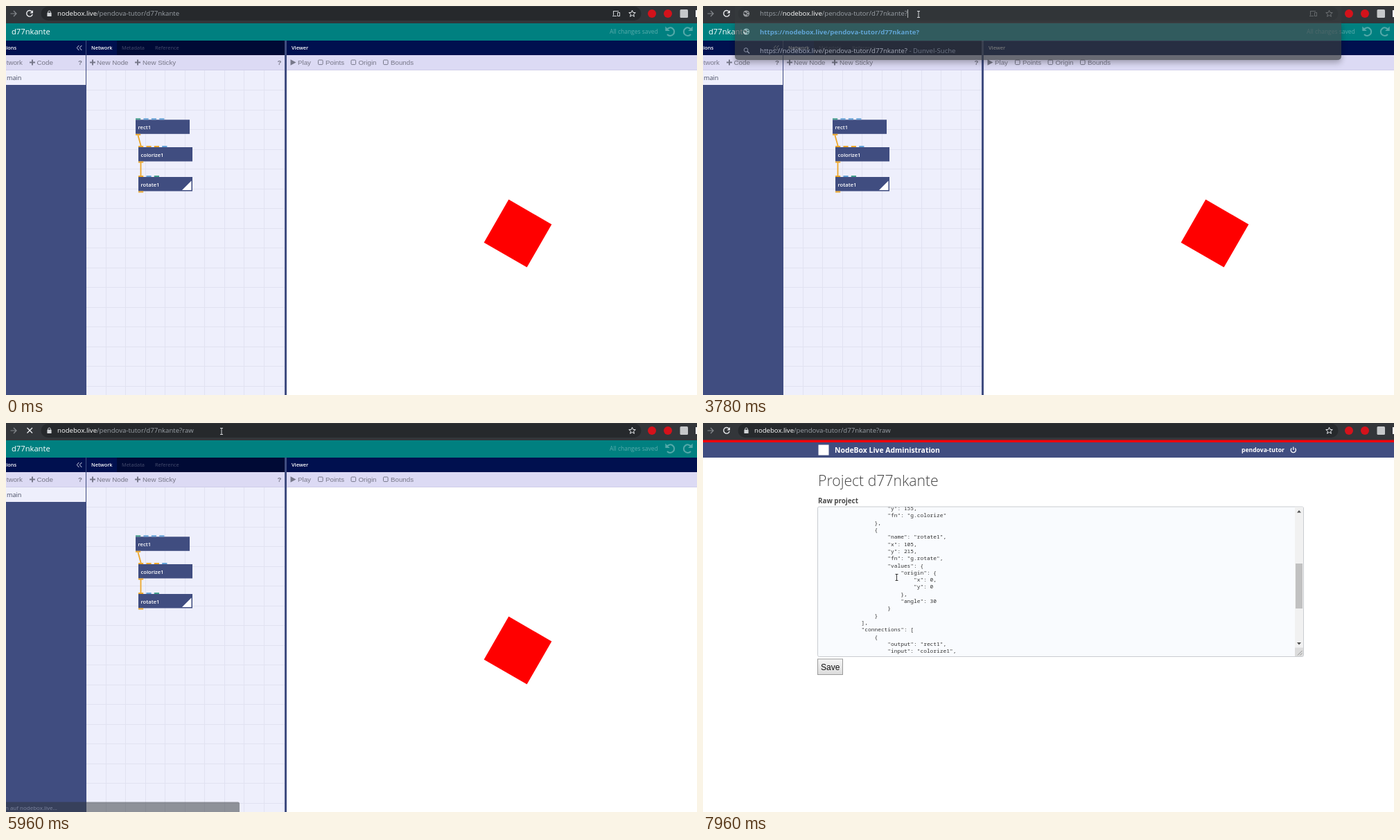
These frames come from a looping animation (997 px wide and 562 px high, 8 s). An HTML page:

```html
<!DOCTYPE html>
<html lang="de">
<head>
<meta charset="utf-8">
<title>Node editor</title>
<style>
html, body { margin: 0; width: 100%; height: 100%; overflow: hidden; background: #fff; }
svg { display: block; width: 997px; height: 562px; font-family: "Open Sans", "Noto Sans", sans-serif; }
text { white-space: pre; }
.ui { font-family: "Liberation Sans", Arial, sans-serif; font-size: 9.75px; fill: #777788; }
.code { font-family: "Noto Sans Mono", "DejaVu Sans Mono", monospace; font-size: 7.87px; fill: #333; }
</style>
</head>
<body>
<svg id="stage" viewBox="0 0 997 562">
  <defs>
    <clipPath id="area"><rect x="166" y="121.5" width="688" height="215.5"/></clipPath>
    <clipPath id="net"><rect x="116" y="93" width="286" height="469"/></clipPath>
    <linearGradient id="btn" x2="0" y2="1"><stop stop-color="#f6f6f6"/><stop offset="1" stop-color="#dcdcdc"/></linearGradient>
    <filter id="shadow" x="-5%" y="-30%" width="110%" height="180%">
      <feDropShadow dx="0" dy="4" stdDeviation="4" flood-opacity=".4"/>
    </filter>
  </defs>
</svg>
<script>
const LOOP = 8000;
const USER = 'pendova-tutor', PROJECT = 'd77nkante', HOST = 'nodebox.live';
const PATH = `/${USER}/${PROJECT}`;
const NAVY = '#00104f', INDIGO = '#404d80', ORANGE = '#eda82c', BLUE = '#64a3d8', GREEN = '#45a08c';
const WHITE = '#fff', GREY = '#9aa0a6', LIGHT = '#e8eaed';

const svg = document.getElementById('stage');

function el(parent, tag, attrs = {}) {
  const e = document.createElementNS('http://www.w3.org/2000/svg', tag);
  for (const k in attrs) e.setAttribute(k, attrs[k]);
  return parent.appendChild(e);
}
const group = (p, attrs) => el(p, 'g', attrs);
const rect = (p, x, y, width, height, fill, more) => el(p, 'rect', { x, y, width, height, fill, ...more });
const shape = (p, d, fill, more) => el(p, 'path', { d, fill, ...more });
const line = (p, d, stroke, w = 1.2) => shape(p, d, 'none', { stroke, 'stroke-width': w });
const disc = (p, cx, cy, r, fill, more) => el(p, 'circle', { cx, cy, r, fill, ...more });
function text(p, x, y, str, size, fill, more) {
  const e = el(p, 'text', { x, y, 'font-size': size, fill, ...more });
  e.textContent = str;
  return e;
}
function label(p, x, y, str, more) {
  el(p, 'text', { x, y, class: 'ui', ...more }).textContent = str;
}
const show = (e, on) => e.setAttribute('visibility', on ? 'visible' : 'hidden');

// Value of the last [time, value] step reached
const at = (t, steps) => steps.reduce((v, s) => (t >= s[0] ? s[1] : v), steps[0][1]);
const within = (t, ...spans) => spans.some(([a, b]) => t >= a && t < b);

// ---------- Editor page ----------
const editor = group(svg);
rect(editor, 0, 0, 997, 562, WHITE);
rect(editor, 0, 25, 997, 25, '#008080');
text(editor, 8, 40.5, PROJECT, 11.2, WHITE);
text(editor, 871, 39.5, 'All changes saved', 8.5, '#5aacac');
for (const flip of ['', 'translate(1942 0) scale(-1 1)']) {
  const g = group(editor, { transform: flip });
  line(g, 'M953.5 34A5.8 5.8 0 1 1 954 41', '#55a9a9', 2);
  shape(g, 'M951.3 29.5v6.5h6.5z', '#55a9a9');
}

rect(editor, 0, 50, 997, 21, NAVY);
rect(editor, 160, 50, 242, 21, '#000a35');
const bold = { 'font-weight': 600 };
text(editor, 15, 62.8, 'Functions', 7.4, WHITE, { ...bold, 'text-anchor': 'end' });
line(editor, 'M105.3 57l-3 3.5 3 3.5M109.3 57l-3 3.5 3 3.5', '#d5d8e8', 1);
text(editor, 123, 62.8, 'Network', 7.3, WHITE, bold);
text(editor, 167, 62.8, 'Metadata', 7.4, '#454d6e');
text(editor, 215, 62.8, 'Reference', 7.4, '#454d6e');
text(editor, 412, 62.8, 'Viewer', 7.4, WHITE, bold);

rect(editor, 0, 71, 997, 22, '#dcdaf4');
rect(editor, 0, 92, 997, 1, '#cfcde9');
const plus = x => line(editor, `M${x} 81.5h8m-4-4v8`, '#77788a', 2);
label(editor, 24, 85, 'Network', { 'text-anchor': 'end' });
[34, 121, 186].forEach(plus);
label(editor, 44.5, 85, 'Code');
label(editor, 131, 85, 'New Node');
label(editor, 197, 85, 'New Sticky');
for (const x of [104, 391.5]) label(editor, x, 85, '?', { 'font-weight': 700 });
shape(editor, 'M410.5 77.3v8.4l8-4.2z', '#77788a');
label(editor, 421, 85, 'Play');
for (const [x, s] of [[450, 'Points'], [497.5, 'Origin'], [544, 'Bounds']]) {
  rect(editor, x + .5, 78, 6.6, 6.6, 'none', { stroke: '#77788a', rx: 1.2 });
  label(editor, x + 11, 85, s);
}

rect(editor, 0, 93, 115, 469, INDIGO);
rect(editor, 0, 93, 115, 21, '#eeeffc');
text(editor, 1, 106.8, 'main', 9.1, '#444a60');

const net = group(editor, { 'clip-path': 'url(#net)' });
rect(net, 116, 93, 286, 469, '#eeeffc');
for (let i = 1; i <= 16; i++) {
  const p = 28.53 * i;
  rect(net, Math.round(115 + p), 93, 1, 469, '#e1e2f1');
  rect(net, 116, Math.round(92.5 + p), 286, 1, '#e1e2f1');
}
line(net, 'M190.5 187L194.8 202.5M194.5 226V245', ORANGE, 1.8);

function node(x, y, name, ports) {
  rect(net, x, y, 78, 20.5, INDIGO);
  ports.forEach((c, i) => rect(net, x + i * 11.4, y - 2, 7.2, 2, c));
  rect(net, x, y + 20.5, 7.2, 2, ORANGE);
  text(net, x + 3.5, y + 13.6, name, 7.6, WHITE, bold);
}
node(187, 164.3, 'rect1', [GREEN, BLUE, BLUE, BLUE]);
node(191, 204, 'colorize1', [ORANGE, ORANGE, ORANGE, BLUE]);
node(191, 247, 'rotate1', [ORANGE, BLUE, GREEN]);
shape(net, 'M254 266L267.5 252.5V266z', WHITE);

rect(editor, 115, 50, 1, 512, INDIGO);
rect(editor, 402, 50, 3, 512, INDIGO);
shape(editor, 'M725.3 279.5L787.3 315.5 751.6 377.5 689.6 341.8z', '#f00');

// ---------- Admin page ----------
const admin = group(svg);
rect(admin, 0, 25, 997, 537, WHITE);
rect(admin, 0, 28, 997, 22, INDIGO);
rect(admin, 166.5, 31.5, 15, 15, WHITE);

const titles = group(admin);
text(titles, 190, 42.8, 'NodeBox Live Administration', 10.4, WHITE, { 'font-weight': 700 });
text(titles, 777, 42.2, USER, 8.6, WHITE, { 'font-weight': 700 });
line(titles, 'M849.3 36.4A3.6 3.6 0 1 0 854.3 36.4M851.8 34.5V39', WHITE, 1.3);
text(titles, 166, 91, `Project ${PROJECT}`, 21.2, '#444', { 'font-weight': 300 });
text(titles, 166, 116, 'Raw project', 9.8, '#4a4a4a', { 'font-weight': 700 });

const link = (output, input) => ({ output, input, port: 'shape' });
const doc = {
  title: PROJECT, color: 'teal', dependencies: { 'core/g': 'dev' }, assets: {},
  functions: [{
    name: 'main', type: 'network', renderedNode: 'rotate1',
    nodes: [
      { name: 'rect1', x: 100, y: 100, fn: 'g.rect' },
      { name: 'colorize1', x: 105, y: 155, fn: 'g.colorize' },
      { name: 'rotate1', x: 105, y: 215, fn: 'g.rotate', values: { origin: { x: 0, y: 0 }, angle: 30 } }
    ],
    connections: [link('rect1', 'colorize1'), link('colorize1', 'rotate1')]
  }]
};
rect(admin, 165.5, 121, 701, 216.5, '#f9fbfe', { stroke: '#c9ccd0', rx: 2 });
const code = group(group(admin, { 'clip-path': 'url(#area)' }));
JSON.stringify(doc, null, 4).split('\n').forEach((s, i) => {
  el(code, 'text', { x: 172, y: 134.2 + i * 10.31, class: 'code' }).textContent = s;
});
rect(admin, 854, 121.5, 12, 203, '#f1f1f1');
const upArrow = shape(admin, 'M857 129.5h6l-3-3.5z', '#505050');
shape(admin, 'M857 317h6l-3 3.5z', '#505050');
const thumb = rect(admin, 855, 133, 10, 65, '#c1c1c1');
rect(admin, 854, 324.5, 12, 12.5, '#dcdcdc');
line(admin, 'M858 335.5l6.5-6.5M861.5 335.5l3-3', '#888', .9);
const save = group(admin);
rect(save, 165.5, 341, 36, 22.5, 'url(#btn)', { stroke: '#9a9a9a' });
label(save, 170, 356.6, 'Save', { style: 'font-size:12px;fill:#111' });

const status = group(svg);
shape(status, 'M0 547.5H334.5Q337 547.5 337 550V562H0z', '#303538');
text(status, 74, 558.5, `Warten auf ${HOST}...`, 8, '#b4b8bc', { 'text-anchor': 'end' });

// ---------- Browser bar ----------
const bar = group(svg);
rect(bar, 0, 0, 997, 25, '#33363a');
const stripe = rect(bar, 0, 24.5, 997, 3.5, '#f0000c');
const pill = rect(bar, 50.5, 1, 866, 20, '#26292c', { rx: 10 });
line(bar, 'M6.5 11h8.5m-4-4l4 4-4 4', '#85898d');
const reload = group(bar);
line(reload, 'M37.3 8A4.3 4.3 0 1 0 38.2 12', LIGHT, 1.4);
shape(reload, 'M39 6v4.5h-4.5z', LIGHT);
const stop = line(bar, 'M30.5 7l7.5 7.5m0-7.5l-7.5 7.5', LIGHT, 1.4);

const lock = group(bar);
rect(lock, 59.4, 9.8, 6.2, 5.2, '#d0d3d6', { rx: .6 });
line(lock, 'M60.7 10V8.8a1.8 1.8 0 0 1 3.6 0V10', '#d0d3d6', 1);
const info = group(bar);
disc(info, 62.5, 11, 4, 'none', { stroke: '#d0d3d6' });
line(info, 'M62.5 10.3v3M62.5 8.3v1.2', '#d0d3d6', 1);

const device = group(bar);
line(device, 'M884 7.5h-7.5v6M875 14.5h6', '#c9ccd0', 1.1);
rect(device, 882.5, 9.5, 3, 5, 'none', { stroke: '#c9ccd0' });
const star = Array.from({ length: 10 }, (_, i) => {
  const a = Math.PI * (i / 5 - .5), r = i % 2 ? 2.2 : 5;
  return `${903.5 + r * Math.cos(a)},${11.2 + r * Math.sin(a)}`;
});
el(bar, 'polygon', { points: star.join(' '), fill: 'none', stroke: LIGHT });
for (const x of [932, 955]) disc(bar, x, 11, 6, '#d4121b');
rect(bar, 972.5, 5, 11.5, 12, '#c6c8ca', { rx: 1.5 });
rect(bar, 995, 6, 2, 10, WHITE);

// ---------- Suggestions ----------
const popup = group(svg);
shape(popup, 'M46 24H921V72q0 6-6 6H52q-6 0-6-6z', '#373b3e', { filter: 'url(#shadow)' });
rect(popup, 46, 24, 875, 27, '#474c50');
function globe(p, y) {
  disc(p, 62.5, y, 4.6, '#c9ccd0');
  shape(p, `M59 ${y - 2}l3 .5 1.5 1.5-2 2-1-1.5-2-.5zM63 ${y - 3.5}l3 2-1.5 1zM63.5 ${y + 1}h2.5l-2 2.5z`, '#3b3f42');
}
globe(popup, 37);
disc(popup, 62, 63.5, 2.8, 'none', { stroke: '#c9ccd0' });
line(popup, 'M64 65.5l3 3', '#c9ccd0');
const hit = text(popup, 82, 40.6, '', 9.6, '#8ab4f8', { 'font-weight': 700 });
const search = text(popup, 82, 67.8, '', 9.6, LIGHT);
const searchUrl = el(search, 'tspan');
el(search, 'tspan', { fill: GREY }).textContent = ' - Dunvel-Suche';
const popupTop = group(svg);
rect(popupTop, 46, 0, 875, 24.5, '#373b3e');
globe(popupTop, 11);

// ---------- Address text ----------
const selection = rect(svg, 74, 4, 0, 14, '#185abc');
const url = text(svg, 74, 14.4, '', 9.6, GREY);
const [scheme, host, rest] = [0, 1, 2].map(() => el(url, 'tspan'));
host.setAttribute('fill', WHITE);
const caret = rect(svg, 0, 5, .8, 12, '#d8dadd');

// ---------- Pointer ----------
const pointer = group(svg);
const halo = disc(pointer, -1.5, -.3, 8.5, '#d2c400', { opacity: .7 });
const arrow = shape(pointer, 'M0 0V10.5L2.5 8.3 4.1 12 5.6 11.3 4 7.7H7.3z', WHITE, { stroke: '#000', 'stroke-width': .7 });
const beam = line(pointer, 'M-2-4.5H2M0-4.5V4.5M-2 4.5H2', LIGHT, .9);

const MOVES = [
  [0, [752, 483]], [420, [690, 440]], [500, [639, 408]],
  [740, [480, 205]], [810, [394, 111]],
  [1120, [386, 96]], [1200, [360, 58]], [1280, [331, 27]], [1370, [315, 15]], [1450, [311, 12]],
  [7050, [309, 22]], [7130, [303, 60]], [7200, [296, 106]], [7280, [289, 152]],
  [7360, [283, 191]], [7430, [280, 214]], [7510, [279.5, 223]]
];
const TYPED = [[0, ''], [3780, '?'], [4720, '?r'], [4800, '?ra'], [5030, '?raw']];
const SCROLL = [[0, 0], [7740, 40], [7810, 105], [7890, 170], [7960, 235]];
const POPUP = [[0, 0], [3780, .7], [3860, 1], [5500, .85], [5570, 0]];
const STATUS = [[0, 0], [5960, .5], [6040, 1], [6520, .66], [6590, .33], [6660, 0]];
const COMMIT = 5960, PAINT = 6040, LOADED = 6190;

function drawAddress(t) {
  const tail = at(t, TYPED);
  const typing = within(t, [3780, 5500]), full = within(t, [2230, 5500]);
  const focus = within(t, [1680, 3780]), selected = within(t, [1840, 2230]);
  const x = typing ? 82 : 74;
  scheme.textContent = full ? 'https://' : '';
  host.textContent = HOST;
  rest.textContent = PATH + tail;
  url.setAttribute('x', x);
  url.setAttribute('fill', selected || (full && !typing) ? LIGHT : GREY);
  const width = url.getComputedTextLength();
  selection.setAttribute('width', width);
  show(selection, selected);
  caret.setAttribute('x', x + width);
  show(caret, within(t, [1680, 1840], [2230, 2770], [3320, 4330], [4720, 5500]));
  const hover = within(t, [1370, 1680], [LOADED, 7050]);
  pill.setAttribute('fill', focus ? '#36393c' : hover ? '#292c2f' : '#26292c');
  pill.setAttribute('stroke', focus ? '#64788e' : 'none');
  pill.setAttribute('stroke-width', 1.3);

  hit.textContent = searchUrl.textContent = 'https://' + HOST + PATH + tail;
  const fade = at(t, POPUP);
  popup.setAttribute('opacity', fade);
  popupTop.setAttribute('opacity', fade);
  show(popupTop, typing);
  const loading = within(t, [5500, LOADED]), unsure = within(t, [5500, COMMIT]);
  show(reload, !loading);
  show(stop, loading);
  show(info, unsure);
  show(lock, !unsure && !typing);
  show(device, t < COMMIT);
}

function drawPages(t) {
  const painted = t >= PAINT;
  show(editor, !painted);
  show(admin, painted);
  show(stripe, painted);
  show(titles, t >= LOADED);
  save.setAttribute('transform', `translate(0 ${t < LOADED ? -.5 : 0})`);
  status.setAttribute('opacity', at(t, STATUS));
  const y = at(t, SCROLL);
  code.setAttribute('transform', `translate(0 ${-y})`);
  thumb.setAttribute('y', 133 + y * 70 / 235);
  upArrow.setAttribute('fill', y ? '#505050' : '#a3a3a3');
}

function drawPointer(t) {
  const [x, y] = at(t, MOVES);
  const inText = y < 22 || (t >= PAINT && y > 121);
  pointer.setAttribute('transform', `translate(${x} ${y})`);
  beam.setAttribute('stroke', y < 25 ? LIGHT : '#222');
  show(beam, inText);
  show(arrow, !inText && t >= 350);
  show(halo, within(t, [1620, 1840], [2230, 2460]));
}

const start = performance.now();
function frame() {
  const t = (performance.now() - start) % LOOP;
  drawPages(t);
  drawAddress(t);
  drawPointer(t);
  requestAnimationFrame(frame);
}
frame();
</script>
</body>
</html>
```
